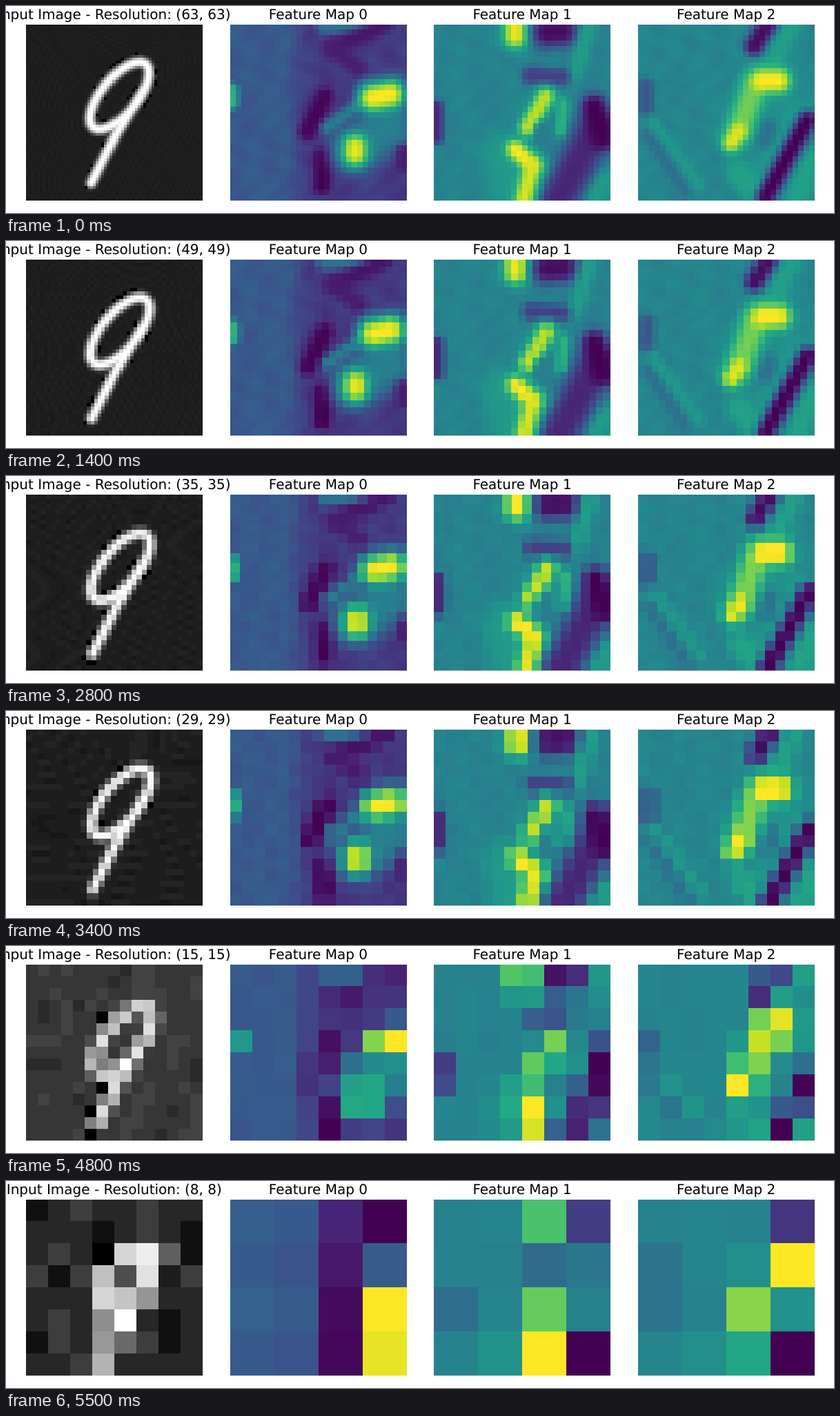
Write an HTML page with a canvas that moves like this. It is 1200 px wide and 300 px high and loops after 5.6 s.

```html
<!DOCTYPE html>
<html lang="en">
<head>
<meta charset="utf-8">
<title>Feature maps by resolution</title>
<style>
  html, body { margin: 0; width: 100%; height: 100%; overflow: hidden; background: #fff; }
  canvas { display: block; }
</style>
</head>
<body>
<canvas id="stage" width="1200" height="300"></canvas>
<script>
const ctx = document.getElementById('stage').getContext('2d');
const W = 256, H = 255, LEFT = 29, TOP = 27, PITCH = 295.6;
const STEP = 100, FIRST = 63, COUNT = 56;
const DRIFT = .45;  // coarse cells show what lies up and left of them
const HALO = .62;

const VIRIDIS = ['440154', '482475', '414487', '355f8d', '2a788e', '21918c',
  '22a884', '44bf70', '7ad151', 'bddf26', 'fde725']
  .map(h => [0, 2, 4].map(i => parseInt(h.slice(i, i + 2), 16)));

// Streaks: from x, y to x, y, half width, value; later ones paint over earlier ones.
const MAPS = [
  {
    base: x => .28 - .09 * smooth((x - 75) / 45),
    streaks: [
      [135, 3, 195, 3, 11, .38],
      [225, 0, 150, 35, 14, .1],
      [150, 35, 185, 65, 14, .12],
      [137, 105, 112, 155, 15, .06],
      [133, 190, 133, 235, 14, .05],
      [180, 180, 230, 150, 36, .43],
      [250, 185, 250, 205, 12, .12],
      [140, 150, 190, 115, 9, .42],
      [207, 107, 232, 102, 16, 1],
      [181, 178, 181, 188, 14, .97],
      [3, 95, 3, 115, 9, .64]
    ]
  },
  {
    base: () => .44,
    streaks: [
      [118, 0, 118, 18, 14, .97],
      [165, 12, 185, 10, 24, .05],
      [225, 5, 205, 70, 12, .55],
      [140, 75, 185, 77, 14, .2],
      [5, 120, 5, 165, 10, .13],
      [100, 190, 110, 235, 36, .53],
      [235, 150, 180, 255, 30, .12],
      [232, 120, 245, 165, 20, .02],
      [250, 225, 235, 250, 14, .54],
      [187, 115, 184, 155, 9, .64],
      [162, 105, 136, 150, 11, .9],
      [156, 150, 152, 168, 10, .42],
      [118, 182, 143, 205, 12, 1],
      [143, 205, 130, 255, 12, .94]
    ]
  },
  {
    base: () => .45,
    streaks: [
      [12, 90, 12, 120, 13, .29],
      [12, 160, 70, 245, 8, .37],
      [22, 140, 90, 235, 8, .53],
      [222, 0, 190, 70, 16, .56],
      [188, 0, 168, 32, 15, .08],
      [230, 130, 185, 225, 24, .53],
      [145, 215, 165, 240, 20, .57],
      [255, 195, 230, 250, 18, .57],
      [170, 88, 146, 155, 16, .78],
      [180, 82, 203, 82, 16, 1],
      [146, 155, 135, 172, 12, .95],
      [190, 150, 185, 168, 13, .38],
      [245, 140, 185, 250, 15, .05]
    ]
  }
];

// The nine: a tilted ring and a bent tail.
const RING = Array.from({ length: 25 }, (_, i) => {
  const t = i / 24 * 2 * Math.PI, tilt = -.88;
  const a = 60 * Math.cos(t), b = 26 * Math.sin(t);
  return [136 + a * Math.cos(tilt) - b * Math.sin(tilt), 104 + a * Math.sin(tilt) + b * Math.cos(tilt)];
});
const TAIL = [[171, 95], [131, 160], [95, 231]];
const segments = pts => pts.slice(1).map((p, i) => [...pts[i], ...p]);
const DIGIT = [...segments(RING), ...segments(TAIL)];

function smooth(t) {
  t = Math.max(0, Math.min(1, t));
  return t * t * (3 - 2 * t);
}

function hash(x, y) {
  const v = Math.sin(x * 127.1 + y * 311.7) * 43758.5453;
  return v - Math.floor(v);
}

// Distance from a point to a line segment.
function distance(x, y, [x0, y0, x1, y1]) {
  const dx = x1 - x0, dy = y1 - y0;
  const k = ((x - x0) * dx + (y - y0) * dy) / (dx * dx + dy * dy);
  const t = Math.max(0, Math.min(1, k));
  return Math.hypot(x - x0 - t * dx, y - y0 - t * dy);
}

const digitDistance = (x, y) => Math.min(...DIGIT.map(s => distance(x, y, s)));
const falloff = (d, w, power) => Math.exp(-Math.pow(d / w, power));

// Calls field at a grid of points in each cell and keeps the mean.
function sample(n, fineCell, spread, points, field) {
  const cell = W / n, drift = DRIFT * (cell - fineCell);
  return Array.from({ length: n * n }, (_, k) => {
    const x = (k % n + .5) * cell - drift, y = (Math.floor(k / n) + .5) * cell - drift;
    let sum = 0;
    for (let p = 0; p < points * points; p++) {
      const u = (p % points + .5) / points - .5, v = (Math.floor(p / points) + .5) / points - .5;
      sum += field(x + u * cell * spread, y + v * cell * spread);
    }
    return sum / (points * points);
  });
}

function drawGrid(left, n, cells, color) {
  const edge = (i, size) => Math.floor(i * size / n);
  cells.forEach((v, k) => {
    const i = k % n, j = Math.floor(k / n);
    const x = edge(i, W), y = edge(j, H);
    ctx.fillStyle = color(Math.max(0, Math.min(1, v)));
    ctx.fillRect(left + x, TOP + y, edge(i + 1, W) - x, edge(j + 1, H) - y);
  });
}

function viridis(v) {
  const i = Math.min(9, Math.floor(v * 10)), f = v * 10 - i;
  return `rgb(${VIRIDIS[i].map((c, k) => Math.round(c + (VIRIDIS[i + 1][k] - c) * f))})`;
}

function gray(v) {
  const c = Math.round(255 * v);
  return `rgb(${c},${c},${c})`;
}

function drawInput(n) {
  const bg = .115 + .1 * falloff(Math.abs(n - 14), 6, 2);
  const points = Math.min(5, Math.ceil(W / n / 3));
  const ink = sample(n, 4, 1, points, (x, y) => falloff(digitDistance(x, y), 7.6, 3));
  const dist = sample(n, 4, 0, 1, digitDistance);
  const peak = Math.max(...ink);
  const cells = ink.map((raw, k) => {
    const v = raw / peak, d = dist[k], cell = W / n;
    if (v > .15) return bg + (1 - bg) * v;
    // Scattered black spots hug the stroke, faint ripples surround it.
    const x = (k % n + .5) * cell, y = (Math.floor(k / n) + .5) * cell;
    if (d < 11 + cell / 2 && hash(Math.floor(x / 9), Math.floor(y / 9)) > .8) return 0;
    const wave = Math.sin(d * .75);
    const grain = wave > .75 ? 1 : wave < -.95 ? -1 : 0;
    return bg + (1 - bg) * v + grain * .7 / n;
  });
  drawGrid(LEFT, n, cells, gray);
}

function paint(v, x, y, streaks) {
  for (const s of streaks) {
    const w = s[4], value = s[5], d = distance(x, y, s);
    if (d > 3 * w) continue;
    if (value > .7 && v < HALO) v += (HALO - v) * falloff(d, w * 1.75, 4);
    v += (value - v) * falloff(d, w, 3);
  }
  return v;
}

function drawMap(index, n) {
  const { base, streaks } = MAPS[index];
  const cells = sample(n, 8, .8, 2, (x, y) => {
    const ripple = .025 * Math.sin(x * .11 + 2 * Math.sin(y * .05 + index)) * Math.sin(y * .09 + x * .03);
    return paint(base(x) + ripple, x, y, streaks);
  });
  // Stretch both ends to the full colour range, keeping the ground tone.
  const lo = Math.min(...cells), hi = Math.max(...cells), mid = base(0);
  const stretch = v => v > mid ? mid + (v - mid) * (1 - mid) / (hi - mid) : mid * (v - lo) / (mid - lo);
  drawGrid(Math.round(LEFT + PITCH * (index + 1)), n, cells.map(stretch), viridis);
}

function title(text, panel) {
  ctx.fillStyle = '#000';
  ctx.fillText(text, 748 + PITCH * (panel - 2), 19);
}

function draw(n) {
  ctx.fillStyle = '#fff';
  ctx.fillRect(0, 0, 1200, 300);
  ctx.font = '20px "DejaVu Sans", sans-serif';
  ctx.textRendering = 'geometricPrecision';
  ctx.textAlign = 'center';
  title(`Input Image - Resolution: (${n}, ${n})`, 0);
  drawInput(n);
  for (let m = 0; m < MAPS.length; m++) {
    title(`Feature Map ${m}`, m + 1);
    drawMap(m, Math.ceil(n / 2));
  }
}

const start = performance.now();
let shown = -1;
function tick() {
  const step = Math.floor((performance.now() - start) / STEP) % COUNT;
  if (step !== shown) {
    shown = step;
    draw(FIRST - step);
  }
  requestAnimationFrame(tick);
}
tick();
</script>
</body>
</html>
```
